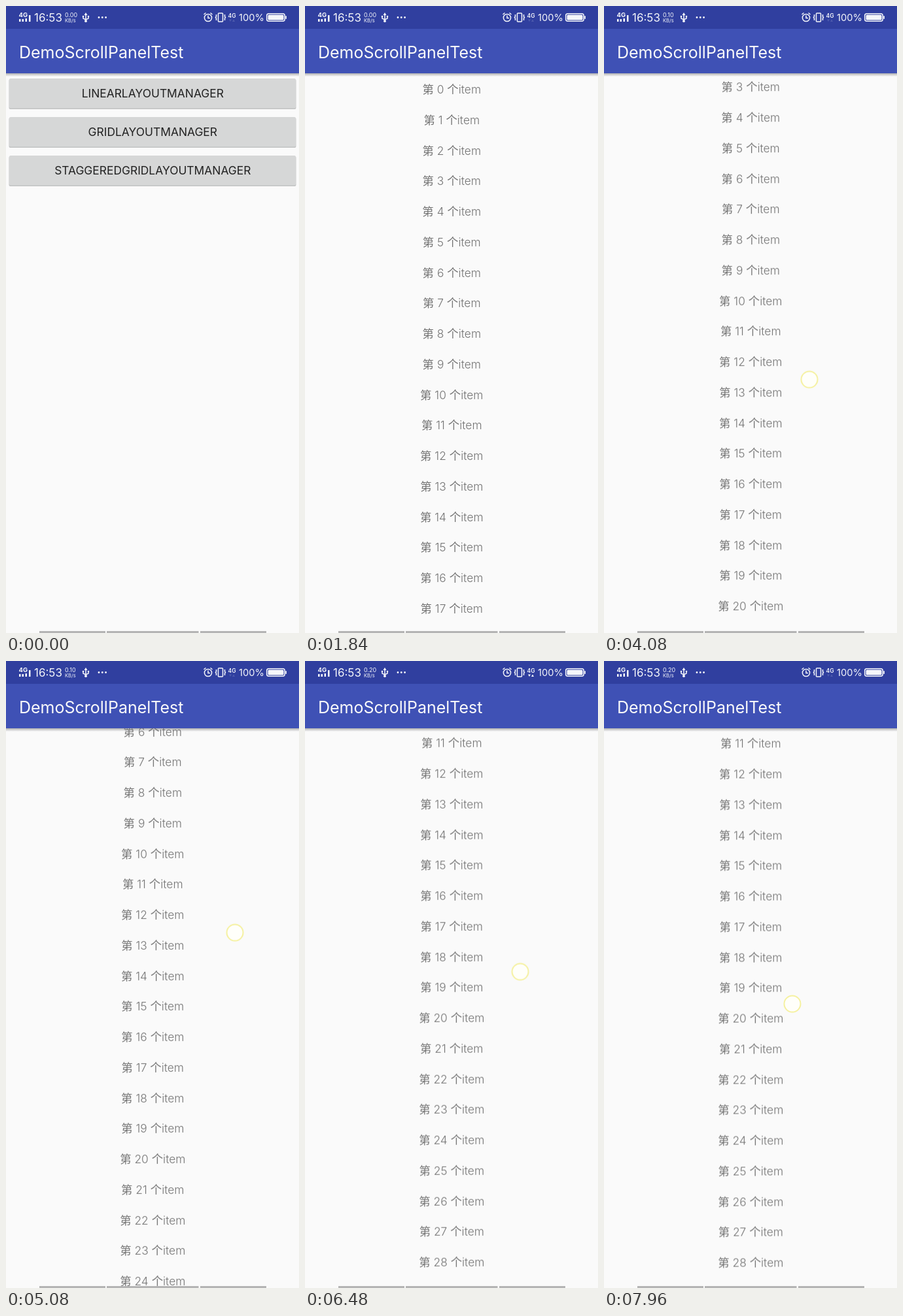
Recreate the animation shown at these times as an HTML page. Size 448 by 960 pixels, loop 8000 ms.

```html
<!DOCTYPE html>
<html lang="zh">
<head>
<meta charset="utf-8">
<title>List scrolling</title>
<style>
html, body { margin: 0; width: 100%; height: 100%; overflow: hidden; background: #fafafa; }
svg { display: block; width: 100vw; height: 100vh; }
text { font-family: Inter, "Noto Sans CJK SC", "Noto Sans CJK JP", sans-serif; }
.anim { animation: 8s linear infinite; }
.hold { animation: 8s step-end infinite; }
.paper { fill: #fafafa; }
.title { font-size: 25px; fill: #fafafa; }
.button rect { fill: #d6d7d7; }
.button .edge { fill: #c2c3c3; }
.button text { font-size: 17.4px; fill: #222; text-anchor: middle; }
#rows text { font-size: 17.4px; font-weight: 350; fill: #747474; text-anchor: middle; }
.status { fill: #f4f6fa; }
.line { fill: none; stroke: #f4f6fa; stroke-width: 1.5; }
.tiny { font-size: 9px; }
.bold { font-size: 9.5px; font-weight: 700; }

#listPage { animation-name: enter; animation-timing-function: cubic-bezier(.2, .6, .2, 1); }
@keyframes enter {
  0%, 10.5% { transform: translateX(448px); }
  15.5%, 100% { transform: none; }
}
#press { animation-name: press; }
@keyframes press { 0%, 8% { opacity: 0; } 9.5% { opacity: .1; } 12%, 100% { opacity: 0; } }

#rows { animation-name: scroll; }
@keyframes scroll {
  0%, 32.5% { transform: translateY(0); }
  39.5% { transform: translateY(-42px); }
  51% { transform: translateY(-143.7px); }
  63.5% { transform: translateY(-300px); }
  67% { transform: translateY(-352px); }
  69%, 73.5% { transform: translateY(-358px); }
  81% { transform: translateY(-516px); }
  85% { transform: translateY(-606px); }
  87%, 88.5% { transform: translateY(-620px); animation-timing-function: ease-out; }
  95% { transform: translateY(-526px); }
  99.5%, 100% { transform: translateY(-515.5px); }
}
#touch { animation-name: drag; }
@keyframes drag {
  0%, 20% { transform: translate(262px, 137px); }
  31% { transform: translate(297px, 726px); }
  32.5% { transform: translate(298px, 716px); }
  39.5% { transform: translate(302px, 674px); }
  51% { transform: translate(314px, 572px); }
  63.5% { transform: translate(350px, 416px); }
  67% { transform: translate(360px, 364px); }
  72.5% { transform: translate(297px, 644px); }
  73.5% { transform: translate(298px, 634px); }
  81% { transform: translate(329px, 476px); }
  85% { transform: translate(350px, 386px); }
  88% { transform: translate(318px, 410px); }
  88.5% { transform: translate(317px, 420px); animation-timing-function: ease-out; }
  95% { transform: translate(291px, 514px); }
  99.5%, 100% { transform: translate(288px, 525px); }
}
#touch circle { fill: #fffffa; stroke: #f5f1a0; stroke-width: 2; animation-name: contact; }
@keyframes contact {
  0%, 9.5%, 67%, 85% { opacity: 0; }
  8%, 31%, 72.5%, 88%, 100% { opacity: 1; }
}
#rate0 { animation-name: rate0; }
#rate1 { animation-name: rate1; }
#rate2 { animation-name: rate2; }
@keyframes rate0 { 0% { opacity: 1; } 32.5%, 100% { opacity: 0; } }
@keyframes rate1 { 0%, 75% { opacity: 0; } 32.5% { opacity: 1; } 100% { opacity: 0; } }
@keyframes rate2 { 0% { opacity: 0; } 75%, 100% { opacity: 1; } }
#traffic { animation-name: traffic; }
@keyframes traffic {
  0%, 45.5%, 82.5%, 100% { opacity: .15; }
  36%, 70% { opacity: 1; }
}
</style>
</head>
<body>
<svg viewBox="0 0 448 960" preserveAspectRatio="none">
  <defs>
    <linearGradient id="shade" x2="0" y2="1">
      <stop stop-color="#666" stop-opacity=".5"/>
      <stop offset="1" stop-color="#666" stop-opacity="0"/>
    </linearGradient>
    <g id="appBar">
      <rect y="103" width="448" height="5" fill="url(#shade)"/>
      <rect y="34" width="448" height="69" fill="#3f51b5"/>
      <text class="title" x="20" y="79.5">DemoScrollPanelTest</text>
    </g>
  </defs>

  <rect class="paper" width="448" height="960"/>
  <g id="menu"></g>
  <rect id="press" class="anim" x="5" y="111" width="438" height="45" rx="2" opacity="0"/>
  <use href="#appBar"/>

  <g id="listPage" class="anim">
    <rect class="paper" y="34" width="448" height="926"/>
    <g id="rows" class="anim"></g>
    <use href="#appBar"/>
  </g>

  <g class="status">
    <rect width="448" height="35" fill="#303f9f"/>
    <text class="bold" x="19.5" y="17">4G</text>
    <path d="M20 20h2.5v4H20zM24.5 20H27v4h-2.5zM29.5 19H32v5h-2.5zM35 14h2.5v10H35z"/>
    <text x="43" y="24" font-size="17">16:53</text>
    <g class="tiny">
      <text id="rate0" class="hold" x="90" y="17">0.00</text>
      <text id="rate1" class="hold" x="90" y="17">0.10</text>
      <text id="rate2" class="hold" x="90" y="17">0.20</text>
    </g>
    <text x="90" y="25" font-size="7.5">KB/s</text>
    <path class="line" d="M122 13v9M118 16v3l4 2 4-2v-3"/>
    <path d="M122 10l2.5 4h-5z"/>
    <circle cx="122" cy="23" r="2"/><circle cx="118" cy="16" r="1.3"/><circle cx="126" cy="16" r="1.3"/>
    <circle cx="142" cy="17.5" r="1.4"/><circle cx="147.3" cy="17.5" r="1.4"/><circle cx="152.6" cy="17.5" r="1.4"/>
    <g class="line">
      <circle cx="309" cy="18" r="5.6"/>
      <path d="M309 14.5V18.5h3M302.5 13l3-2.5M315.5 13l-3-2.5"/>
      <rect x="324.5" y="11" width="7" height="13" rx="1"/>
      <path d="M321.5 13v3l-1 1.5 1 1.5v3M334.5 13v3l1 1.5-1 1.5v3"/>
    </g>
    <text x="339.5" y="18" font-size="8.5" font-weight="600">4G</text>
    <path id="traffic" class="hold" d="M341 20.5h4l-2 3.5zM346 24h4l-2-3.5z"/>
    <text x="356" y="23" font-size="14.7">100%</text>
    <rect class="line" x="398.7" y="11.7" width="27.5" height="11.5" rx="3"/>
    <rect x="400.5" y="13.5" width="24" height="8" rx="1.5"/>
    <rect x="427.3" y="15" width="1.7" height="5" rx=".8"/>
  </g>

  <path fill="#b4b4b4" d="M51 957h101v3H51zM154 957h140.5v3H154zM297 957h101v3H297z"/>
  <g id="touch" class="anim"><circle class="hold" r="12.5"/></g>
</svg>
<script>
const labels = ["LINEARLAYOUTMANAGER", "GRIDLAYOUTMANAGER", "STAGGEREDGRIDLAYOUTMANAGER"];
const rowHeight = 46.75;
const rowCount = 36;

document.getElementById("menu").innerHTML = labels.map((label, i) => {
  const y = 111 + i * 59;
  return `<g class="button">
    <rect class="edge" x="4.5" y="${y + 1}" width="439" height="46" rx="2"/>
    <rect x="5" y="${y}" width="438" height="45.5" rx="2"/>
    <text x="224.3" y="${y + 29.3}">${label}</text></g>`;
}).join("");

document.getElementById("rows").innerHTML = Array.from({ length: rowCount }, (_, i) =>
  `<text x="224.3" y="${134 + i * rowHeight}">第 ${i} 个item</text>`
).join("");
</script>
</body>
</html>
```
